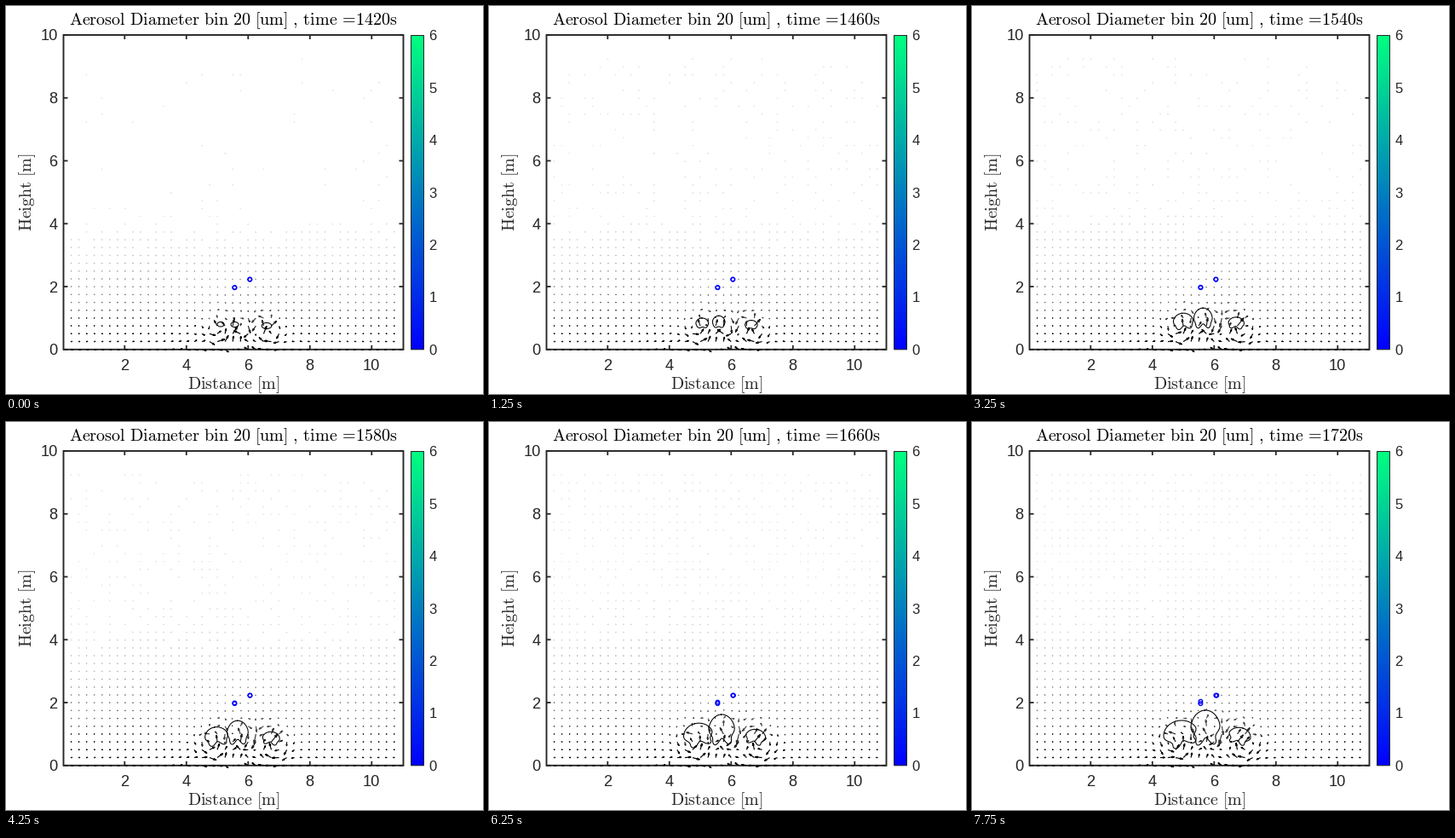
A matplotlib script for the animation above (8 s loop, 560 px wide and 455 px high).

```python
import numpy as np
import matplotlib.pyplot as plt
from matplotlib.animation import FuncAnimation
from matplotlib.collections import LineCollection
from matplotlib.patches import Rectangle

plt.rcParams["mathtext.fontset"] = "cm"
plt.rcParams["font.family"] = "Liberation Sans"

W, H, DPI = 560, 455, 80
PX = 72 / DPI  # points per pixel
INK = "#262626"
LEFT, RIGHT, TOP, BOTTOM = 67.5, 466.5, 34, 402.8
X0, SX, SY = 66.8, 36.25, 36.88  # distance origin, pixels per metre
FRAMES, STEP_MS, LAST = 32, 250, 30

fig = plt.figure(figsize=(W / DPI, H / DPI), dpi=DPI, facecolor="white")
ax = fig.add_axes([0, 0, 1, 1])
ax.axis("off")


def label(x, y, text, size, color=INK, **kw):
    return ax.text(x, y, text, fontsize=size * PX, color=color, va="baseline", **kw)


def roman(text):
    text = text.replace(", ", r",\,").replace("=", r"\!=\!").replace(" ", r"\ ")
    return r"$\mathrm{" + text + "}$"


def frame_box(left, right, top, bottom, width):
    ax.add_patch(Rectangle((left, top), right - left, bottom - top, fill=False,
                           ec=INK, lw=width * PX, zorder=4, snap=False))


def tick(x, y, dx=0, dy=0):
    ax.plot([x, x + dx], [y, y + dy], color=INK, lw=1.8 * PX,
            solid_capstyle="butt", zorder=4, snap=False)


def draw_axes():
    frame_box(LEFT, RIGHT, TOP, BOTTOM, 1.9)
    for v in range(0, 11, 2):
        x, y = X0 + SX * v, BOTTOM - SY * v
        if v:
            tick(x, BOTTOM, dy=-5)
            tick(x, TOP, dy=5)
            label(x - .3, 427, str(v), 18.2, ha="center")
        tick(LEFT, y, dx=5)
        tick(RIGHT, y, dx=-5)
        label(60.5, y + 6.5, str(v), 18.2, ha="right")
    label(267, 449, roman("Distance [m]"), 20, ha="center")
    label(30, 218, roman("Height [m]"), 20, ha="center",
          rotation=90, rotation_mode="anchor")


def draw_colorbar():
    left, right, top, bottom = 475.5, 490.5, 34.5, 402.8
    ax.imshow(np.linspace(1, 0, 256)[:, None], cmap="winter", aspect="auto",
              extent=(left, right, bottom, top), zorder=3)
    frame_box(left, right, top, bottom, 1)
    for v in range(7):
        label(496.5, bottom - (bottom - top) * v / 6 + 6, str(v), 16.6, ha="left")


class Plume:
    """A rising cap; its box (centre x, bottom, width, height) grows with time."""

    def __init__(self, start, growth, lean):
        self.start, self.growth, self.lean = np.array(start), np.array(growth), lean
        self.heading = np.array([-2 * lean, -1]) / np.hypot(2 * lean, 1)

    def box(self, k):
        return self.start + self.growth * (k / LAST) ** .75

    def outline(self, k):
        cx, bottom, width, height = self.box(k)
        age, bud = k / LAST, min(1, k / 7)
        t = np.linspace(0, 2 * np.pi, 90)
        x, y = np.sin(t), -np.cos(t)
        y = y - .6 * bud * np.exp(-((t - np.pi) / .4) ** 2)
        x = x * (1 - .3 * age * np.exp(-((y - .35) / .3) ** 2)) + self.lean * age * y
        y = y - self.lean * age * x
        fit = lambda a: (a - a.min()) / np.ptp(a)
        return cx + width * (fit(x) - .5), bottom + height * (fit(y) - 1)


PLUMES = [Plume((252, 376, 8, 5.5), (-8, 7, 30, 27.5), .35),
          Plume((268.5, 376.5, 9, 6), (5.5, 2.5, 25, 35), .05),
          Plume((306, 378.5, 11.5, 7), (8.5, .8, 13.5, 14), -.35)]

COL, ROW = (g.ravel() for g in np.meshgrid(np.arange(1, 44), np.arange(38)))
GX, GY = X0 + SX * COL / 4, BOTTOM - SY * ROW / 4
rng = np.random.default_rng(4)
SPARSE = rng.random(GX.size)
TURN = rng.normal(0, .45, GX.size)


def flow(k):
    """Air flow at the grid points, in pixels of arrow length."""
    dx, dy = GX - 268, GY - 372
    dist = np.hypot(dx, dy) + 1e-6
    near = np.exp(-(dist / 62) ** 2)
    pull = 1.7 * np.exp(-ROW / 4) * (1 + 2 * near)
    u, v = -dx / dist * pull, -dy / dist * pull
    u -= np.tanh(dx / 12) * np.exp(-ROW) * (1 + 3 * np.exp(-np.abs(dx) / 55))
    sigma = 9 + .13 * k
    for plume in PLUMES:
        cx, bottom, _, height = plume.box(k)
        ex, ey = plume.heading
        rx, ry = GX - cx, GY - (bottom - height / 2 + 4)
        along, across = rx * ex + ry * ey, ry * ex - rx * ey
        fade = 13 * np.exp(-(along ** 2 + across ** 2) / (2 * sigma ** 2))
        fa = fade * (1 - (across / sigma) ** 2)
        fb = fade * along * across / sigma ** 2
        u += fa * ex - fb * ey
        v += fa * ey + fb * ex
    v[ROW == 0] = 0
    turn = TURN * near
    return u * np.cos(turn) - v * np.sin(turn), u * np.sin(turn) + v * np.cos(turn)


def arrows(k):
    u, v = flow(k)
    size = np.hypot(u, v) + 1e-6
    d = np.stack([u, v], 1) / size[:, None]
    length = np.clip(size, 1, 12)[:, None]
    side = d[:, ::-1] * [-1, 1]
    tail = np.stack([GX, GY], 1)
    tip = tail + d * length
    back, half = tip - d * length * .33, side * length * .11
    return np.stack([tail, tip, back + half, back - half, tip], 1)


def arrow_colors(k):
    """Dots fade with height; the faint upper ones flicker and slowly fill in."""
    alpha = np.clip(np.exp(-(ROW - 2) / (6.5 + k / 12)), .1, 1)
    noise = (SPARSE + np.random.default_rng(k).random(GX.size)) / 2
    seen = noise < np.exp(-np.maximum(0, ROW - 12) / 3) + .12 + .5 * k / LAST
    return np.column_stack([np.zeros((GX.size, 3)), alpha * seen])


def droplets(k):
    shift = (k / LAST) ** 2
    a, b = np.array([268.4, 330.2]), np.array([286.3, 320.6])
    return [a, a - [0, 2.5 * shift], b, b + [shift, 0]]


draw_axes()
draw_colorbar()
ax.set(xlim=(0, W), ylim=(H, 0))
title = label(266.8, 22, "", 20.1, "black", ha="center")
quiver = LineCollection([], linewidths=1.2 * PX, joinstyle="round", zorder=5, snap=False)
ax.add_collection(quiver, autolim=False)
outlines = [ax.plot([], [], color="black", lw=1.05 * PX, zorder=6)[0] for _ in PLUMES]
drops = ax.scatter([], [], s=(4.5 * PX) ** 2, facecolors="none", edgecolors="#0000ff",
                   linewidths=1.4 * PX, zorder=7, snap=False)


def update(frame):
    k = max(0, frame - 1)
    title.set_text(roman(f"Aerosol Diameter bin 20 [um] , time ={1420 + 10 * k}s"))
    quiver.set_segments(arrows(k))
    quiver.set_color(arrow_colors(k))
    for line, plume in zip(outlines, PLUMES):
        line.set_data(*plume.outline(k))
    drops.set_offsets(droplets(k))
    return [title, quiver, drops, *outlines]


anim = FuncAnimation(fig, update, frames=FRAMES, interval=STEP_MS,
                     init_func=lambda: update(0), repeat=True, repeat_delay=0)
plt.show()
```
